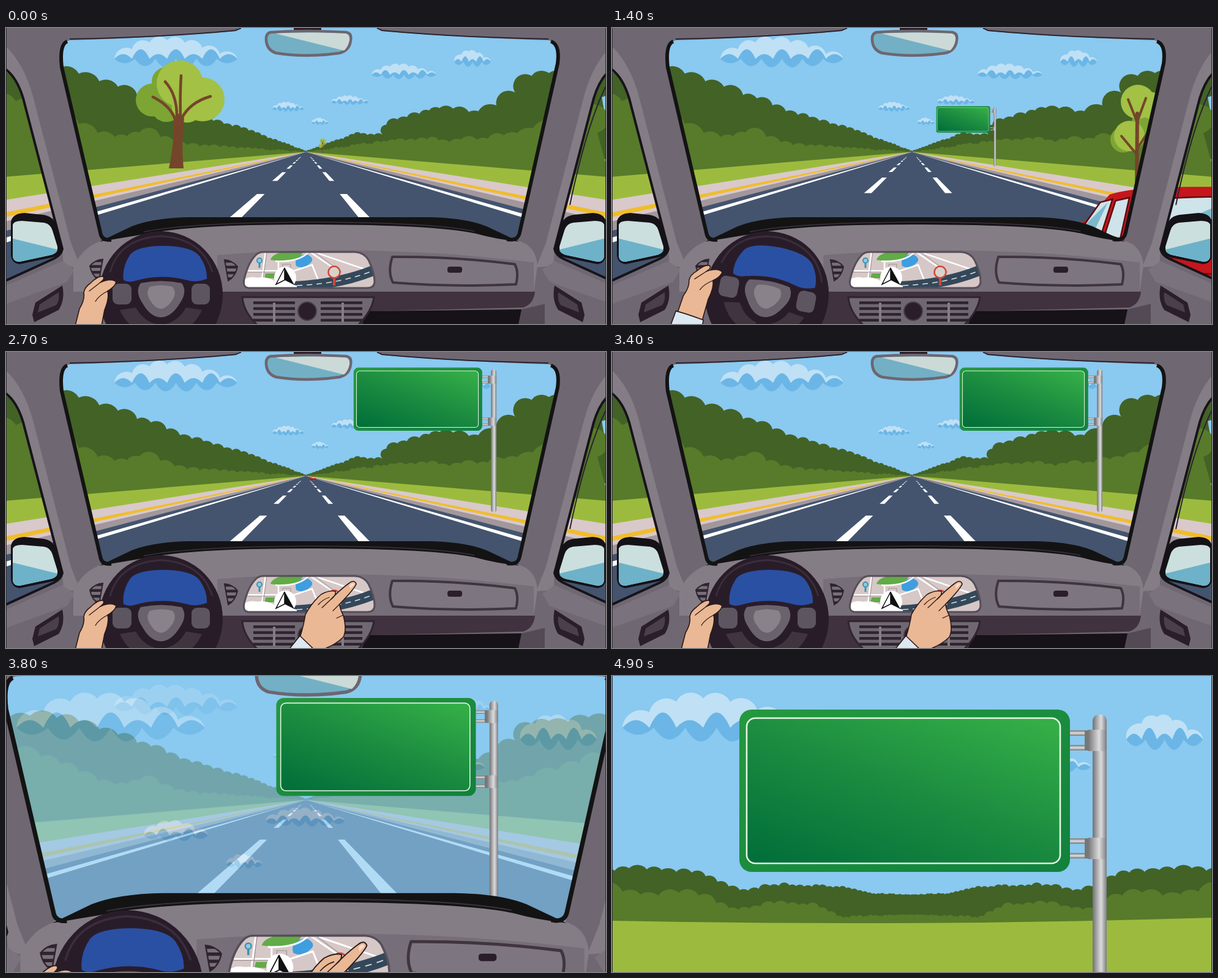
Recreate the animation shown at these times as an HTML page. Size 980 by 485 pixels, loop 5 s.

```html
<!DOCTYPE html>
<html lang="en">
<head>
<meta charset="utf-8">
<title>Road sign drive</title>
<style>
html, body { margin: 0; width: 100%; height: 100%; overflow: hidden; background: #8ac9f0; }
svg { display: block; width: 980px; height: 485px; }
.skin { fill: #eab895; stroke: #2b1a18; stroke-width: 1.6; stroke-linejoin: round; }
.crease { fill: none; stroke: #2b1a18; stroke-width: 1.3; stroke-linecap: round; }
.sleeve { fill: #dbe9f2; stroke: #2b1a18; stroke-width: 1.6; }
.wood { fill: none; stroke: #74452a; stroke-linecap: round; }
.shade { fill: #7ca534; }
.bright { fill: #a2c145; }
.road { fill: none; stroke: #fff; stroke-width: 2.5; }
.slats { fill: none; stroke: #2e232e; stroke-dasharray: 4.5 5; }
</style>
</head>
<body>
<svg viewBox="0 0 980 485">
<defs>
  <linearGradient id="panel" x1=".1" y1="1" x2=".9" y2="0">
    <stop offset="0" stop-color="#02703a"/><stop offset=".5" stop-color="#1b8b40"/><stop offset="1" stop-color="#34ae47"/>
  </linearGradient>
  <linearGradient id="rim" x1="0" y1="0" x2="1" y2="1">
    <stop offset="0" stop-color="#25993f"/><stop offset="1" stop-color="#11813d"/>
  </linearGradient>
  <linearGradient id="steel">
    <stop offset="0" stop-color="#717174"/><stop offset=".35" stop-color="#b0b0b2"/>
    <stop offset=".6" stop-color="#dcdcdd"/><stop offset="1" stop-color="#7c7c80"/>
  </linearGradient>
  <linearGradient id="bar" x2="0" y2="1">
    <stop offset="0" stop-color="#777"/><stop offset=".5" stop-color="#ddd"/><stop offset="1" stop-color="#777"/>
  </linearGradient>
  <clipPath id="screen"><path id="screenShape" d="M420 367H570Q585 368 592 380Q602 400 602 415Q602 426 590 426H398Q386 426 389 412Q395 385 408 372Q413 367 420 367Z"/></clipPath>
  <clipPath id="leftVent"><path id="leftVentShape" d="M137 390Q145 380 158 379L152 413Q140 406 137 390Z"/></clipPath>
  <g id="sideVent" stroke-width="2">
    <use href="#leftVentShape" fill="#776f79"/>
    <path class="slats" stroke-width="24" clip-path="url(#leftVent)" stroke-dasharray="2 3" d="M148 379V413"/>
    <use href="#leftVentShape" fill="none" stroke="#2f2430"/>
  </g>
  <g id="side">
    <path fill="#857d86" d="M0 30Q30 60 44 112L106 352L122 392L94 390L92 362L28 115Q18 82 0 68Z"/>
    <path fill="none" stroke="#17131a" stroke-width="4" d="M-20 60L0 68Q18 82 28 115L92 362Q90 372 78 378L-20 423"/>
    <path fill="#141216" d="M8 318Q10 304 30 303L60 306Q78 308 82 325L92 358Q93 372 75 376L22 387Q8 385 8 370Z"/>
    <path fill="#cbdfde" d="M11 322Q13 316 26 316L62 319Q73 321 76 332L84 358Q85 369 73 372L22 383Q11 383 11 372Z"/>
    <path fill="#6db2c8" d="M11 345L84 363Q84 369 73 372L22 383Q11 383 11 372Z"/>
    <path fill="#7a727c" d="M0 422L92 382L112 396L100 416L0 452Z"/>
    <path fill="#2a1e2a" d="M43 470L48 450L92 422Q97 445 86 462L46 482Z"/>
    <path fill="#4a404c" d="M52 466L55 453L86 433Q88 446 82 454Z"/>
  </g>
</defs>

<rect width="980" height="485" fill="#8ac9f0"/>
<g id="clouds"></g>
<g id="land"></g>
<path id="lanes" fill="#fff"/>
<g id="fade">
  <rect width="980" height="485" fill="#8ac9f0"/>
  <g id="clouds2"></g>
  <g id="field"></g>
</g>

<g id="sign">
  <rect x="-12" y="8" width="23" height="600" rx="10" fill="url(#steel)"/>
  <g id="clamp">
    <rect x="-52" y="34" width="32" height="9" fill="url(#bar)"/>
    <rect x="-52" y="58" width="32" height="9" fill="url(#bar)"/>
    <rect x="-25" y="34" width="6" height="33" fill="#777"/>
    <rect x="-20" y="33" width="31" height="35" rx="2" fill="url(#steel)"/>
  </g>
  <use href="#clamp" y="177"/>
  <rect x="-589" width="540" height="266" rx="20" fill="url(#rim)"/>
  <rect x="-577" y="14" width="512" height="238" rx="14" fill="url(#panel)" stroke="#e4f5e2" stroke-width="2.6"/>
</g>

<g id="tree">
  <g class="shade"><circle cx="239" cy="118" r="27"/><circle cx="262" cy="129" r="25"/><circle cx="262" cy="88" r="24"/></g>
  <g class="bright"><circle cx="284" cy="91" r="38"/><circle cx="321" cy="117" r="36"/><circle cx="296" cy="130" r="25"/></g>
  <path fill="#74452a" d="M266 230Q275 190 274 148L282 140L291 148Q286 190 290 230Z"/>
  <path class="wood" stroke-width="4.5" d="M277 152Q270 128 240 113M279 148Q280 110 260 88M285 150Q284 110 286 78M287 148Q300 122 334 112"/>
</g>
<g id="farTree">
  <g class="shade"><circle cx="-24" cy="-82" r="21"/><circle cx="12" cy="-110" r="22"/></g>
  <g class="bright"><circle cx="0" cy="-144" r="28"/><circle cx="-14" cy="-88" r="25"/><circle cx="22" cy="-138" r="22"/></g>
  <path class="wood" stroke-width="6" d="M-2 0L-1-125"/>
  <path class="wood" stroke-width="4" d="M-2-58L-27-88M-2-66L20-100M-1-110L-16-148M-1-112L13-150"/>
</g>

<g id="car">
  <ellipse cx="600" cy="297" rx="8" ry="13" fill="#2d292d"/>
  <path fill="#c5161d" d="M592 270Q591 252 602 249L608 244L619 231Q636 225 690 226Q722 227 728 237L735 262Q740 270 740 285L739 308Q735 315 720 314L640 312Q622 310 612 305Q608 288 600 285Q593 286 592 292Z"/>
  <ellipse cx="599" cy="297" rx="4" ry="9" fill="#aaa5a5"/>
  <ellipse cx="625" cy="306" rx="8" ry="9" fill="#2d292d"/><ellipse cx="624" cy="307" rx="4" ry="6" fill="#aaa5a5"/>
  <g fill="#cfe3ea" stroke="#5c0c10" stroke-width="1">
    <path d="M601 253L613 236L621 234L614 256Z"/><path d="M616 257L623 235L632 233L626 260Z"/>
    <path d="M644 235Q684 230 722 235L728 262Q685 267 640 262Z"/>
  </g>
  <path fill="#7db9cd" d="M641 259L700 234L716 235L655 263L641 261ZM601 253L618 236L609 255Z"/>
  <path fill="#a01016" d="M632 284Q680 292 739 283L739 308Q735 315 720 314L640 312Q632 306 632 284Z"/>
  <path fill="#e4322f" d="M633 266L655 269L652 279L634 277ZM738 268L716 270L718 280L739 278Z"/>
  <path fill="none" stroke="#7a0c11" stroke-width="1.2" d="M656 268Q665 282 680 283H710L718 268M633 262L631 306M616 258Q610 275 616 295"/>
  <rect x="668" y="305" width="42" height="6" fill="#f1cfc6"/>
</g>

<g id="cabin">
  <path fill="#6f6872" fill-rule="evenodd" d="M-60-60H1040V560H-60ZM104 20Q260 15 375 5Q385 2 384-60H606Q604 2 614 5Q730 15 886 20Q904 24 902 48L837 348H156L90 62Q88 24 104 20Z
    M-60 40L0 68Q18 82 28 115L92 362Q90 372 78 378L0 414L-60 440ZM1048 40L988 68Q970 82 960 115L896 362Q898 372 910 378L988 414L1048 440Z"/>
  <use href="#side"/><use href="#side" transform="matrix(-1 0 0 1 988 0)"/>
  <path fill="none" stroke="#2b2430" stroke-width="2" d="M104 18Q260 15 375 4L384 0M886 18Q730 15 614 4L606 0M980 95Q948 160 921 290"/>
  <path fill="#857d86" d="M110 392Q125 358 158 348L205 325Q260 315 490 315Q730 315 780 325L835 348Q866 356 868 390L862 432H110Z"/>
  <path fill="#766e78" d="M345 372Q600 352 862 384V434H345Z"/>
  <path fill="#141314" d="M153 350L205 325Q240 311 300 310H690Q750 311 785 325L838 350Q800 346 768 337Q700 322 490 322Q300 322 225 338Z"/>
  <path fill="none" stroke="#3a333c" stroke-width="1.5" d="M225 334Q300 319 490 318Q690 318 765 333"/>
  <path fill="none" stroke="#141314" stroke-width="6" stroke-linejoin="round" d="M100 22Q87 27 91 64L154 335Q156 349 172 347M890 22Q905 27 901 58L839 335Q836 350 818 346"/>
  <path fill="#40333f" d="M340 432H864Q862 452 845 458L600 464V490H340Z"/>
  <path fill="#171118" d="M590 464L842 461V490H580Z"/>
  <path fill="#534a55" d="M842 461L880 452V490H836Z"/>
  <path fill="#6f6872" stroke="#2f2430" stroke-width="3" d="M386 441H601Q598 464 574 488H412Q388 466 386 441Z"/>
  <path class="slats" stroke-width="68" d="M438 448V483M548 448V483"/>
  <path stroke="#857d86" stroke-width="4" d="M438 450V482M550 450V482"/>
  <circle cx="492" cy="464" r="15" fill="#2a1e2a" stroke="#4a3f4b" stroke-width="2"/>
  <use href="#sideVent"/><use href="#sideVent" transform="matrix(-1 0 0 1 515 1)"/>
  <path fill="#7d757f" stroke="#40353f" stroke-width="4" stroke-linejoin="round" d="M631 375Q730 374 831 387Q838 400 833 420Q730 425 632 417Q623 400 631 375Z"/>
  <rect x="721" y="391" width="24" height="10" rx="4" fill="#2a1e2a"/>

  <g clip-path="url(#screen)">
    <rect x="380" y="360" width="230" height="70" fill="#d6c8c7"/>
    <path fill="#62ab46" d="M432 380Q436 364 487 364L478 380Q455 384 432 380ZM424 402H440V410H422Z"/>
    <path fill="#3f9edf" d="M474 390Q470 378 482 373Q490 368 497 374Q504 380 496 386Q486 396 474 390Z"/>
    <path class="road" d="M424 366L418 412M395 398H470M440 382Q480 384 495 366L545 400M470 398L500 388L515 426M445 382V405M500 366L600 400"/>
    <path fill="none" stroke="#9b9296" d="M392 400H470M426 366L420 412M500 364L548 400M452 387H465V395H452Z"/>
    <path fill="none" stroke="#34485a" stroke-width="17" d="M465 424Q550 420 610 393"/>
    <path fill="none" stroke="#d9e0e2" stroke-width="1.5" stroke-dasharray="9 7" d="M475 422Q550 419 606 395"/>
    <path fill="#fff" d="M385 430V414Q396 406 410 409Q425 407 438 414L475 422V430Z"/>
    <path fill="none" stroke="#3e93b4" stroke-width="3" d="M414 385V393"/><circle cx="414" cy="381" r="4" fill="#8fcbe0" stroke="#3e93b4" stroke-width="2"/>
    <path stroke="#d4463a" stroke-width="4" d="M536 408V422"/>
    <circle cx="536" cy="400" r="9.5" fill="#d8d2cc" stroke="#d4463a" stroke-width="2.5"/>
    <circle cx="456" cy="409" r="18" fill="#fff"/>
    <path fill="#fff" stroke="#111" stroke-width="1.5" d="M455 393L441 420L455 413Z"/><path fill="#111" d="M455 392L471 421L455 413Z"/>
  </g>
  <use href="#screenShape" fill="none" stroke="#574e59" stroke-width="3"/>

  <path fill="#2a1e2a" d="M470-30H515V3Q492 7 470 3Z"/>
  <path id="mirror" fill="#73b0c5" stroke="#6d6670" stroke-width="4.5" d="M432 7Q490 3 556 7Q565 9 563 20Q561 37 545 41Q490 49 441 41Q426 36 425 20Q424 9 432 7Z"/>
  <path fill="#cbdad6" d="M440 9Q490 6 555 9Q562 11 561 20Q559 31 552 37Z"/>

  <g id="wheel">
    <ellipse cx="253" cy="437" rx="101" ry="104" fill="#291c29"/>
    <path fill="none" stroke="#3b2d3b" stroke-width="3" d="M170 400Q185 345 253 341Q320 345 337 400"/>
    <path fill="#2a50a3" d="M192 413Q189 392 203 371Q215 357 260 357Q305 358 317 375Q329 393 328 411Q310 418 295 413Q253 402 212 414Q200 418 192 413Z"/>
    <path fill="#40343f" d="M186 462L212 458Q224 480 245 485L240 505Q200 495 186 462ZM320 462L294 458Q282 480 261 485L266 505Q306 495 320 462Z"/>
    <g fill="#5d5560"><rect x="174" y="419" width="31" height="34" rx="9"/><rect x="303" y="419" width="30" height="34" rx="9"/></g>
    <path fill="#6a626c" d="M220 418Q253 411 287 418Q297 432 284 451Q270 474 253 474Q236 474 223 451Q210 432 220 418Z"/>
    <path fill="#8a828b" d="M235 424Q253 419 272 424Q280 434 271 447Q262 460 253 460Q244 460 236 447Q227 434 235 424Z"/>
  </g>
  <g id="grip">
    <path class="skin" d="M112 492L120 460Q129 445 127 434Q128 425 138 418Q150 406 158 407Q163 410 154 417Q172 409 180 416Q178 424 166 431Q169 443 161 462L154 498Z"/>
    <path class="sleeve" d="M110 486Q132 490 156 497L150 560H90Z"/>
    <path class="crease" d="M154 417L136 431M166 431Q152 438 146 448"/>
  </g>

  <g id="hand">
    <path class="skin" d="M560 379Q569 372 572 380Q570 387 545 413Q545 420 551 432Q557 455 551 467Q535 483 506 491L480 468Q487 445 489 430Q500 410 515 397Q528 390 538 392Q540 398 531 405Q545 390 560 379Z"/>
    <path class="sleeve" d="M480 465L508 492L480 560L420 540Z"/>
    <path class="crease" d="M531 405L516 419M545 413L534 424M551 431L540 436M510 414Q518 405 528 402"/>
    <path fill="#f8dccb" d="M561 382Q568 376 569 381L562 388Z"/>
  </g>
</g>
<path stroke="#2b2b30" d="M.5 0V485M979.5 0V485"/>
</svg>
<script>
const $ = id => document.getElementById(id);
const VX = 490, VY = 203, LOOP = 5;
const DARK = '#436226', LEAF = '#577b2a', GRASS = '#9cbb3e';

let seed = 7;
const random = () => (seed = seed * 16807 % 2147483647) / 2147483647;

// Linear interpolation through [position, value] pairs
const key = (t, ...k) => {
  const i = k.findIndex(p => t < p[0]);
  if (i === 0) return k[0][1];
  if (i < 0) return k[k.length - 1][1];
  const [[a, u], [b, v]] = [k[i - 1], k[i]];
  return u + (v - u) * (t - a) / (b - a);
};

// Arcs along a hump for the lit top, waves for the shaded foot
function cloud(x, y, w, h) {
  const n = w > 3 * h ? 7 : 5, step = w / n, foot = .72 * h;
  let top = `M0 ${foot}`, wave = top, py = foot;
  for (let i = 1; i <= n; i++) {
    const q = foot - .58 * h * Math.sin(Math.PI * (i / n) ** .8) ** 1.3;
    const r = Math.hypot(step, q - py) * .6;
    top += `A${r} ${r} 0 0 1 ${i * step} ${q}`;
    wave += `q${step / 2} ${-h * (i % 2 ? .3 : .6)} ${step} 0`;
    py = q;
  }
  for (let i = 1; i < n; i++) {
    const s = w / (n - 1);
    wave += `q${-s / 2} ${.55 * h * Math.sin(Math.PI * (i - .5) / (n - 1)) ** .5} ${-s} 0`;
  }
  return `<g transform="translate(${x} ${y})"><path fill="#bfe0f5" d="${top}Z"/><path fill="#6bb6e6" d="${wave}Z"/></g>`;
}

// Discs strung along a tree line, smaller towards the horizon
function hedge(color, base, size, ...line) {
  const start = line[0][0], end = line[line.length - 1][0];
  let d = `M${start} ${base}`, discs = '';
  for (let x = start, r; x <= end; x += r * 1.35) {
    r = 3 + Math.abs(x - VX) * size * (.8 + .4 * random());
    const y = key(x, ...line) + r * (1 + .35 * random());
    d += `L${x} ${y}`;
    discs += `<circle cx="${x}" cy="${y}" r="${r}"/>`;
  }
  return `<g fill="${color}"><path d="${d}L${end} ${base}Z"/>${discs}</g>`;
}
const wedge = (slope, color) =>
  `<path fill="${color}" d="M${VX} ${VY}L-510 ${VY + 1000 * slope}V1400H1490V${VY + 1000 * slope}Z"/>`;

$('clouds').innerHTML = cloud(177, 13, 201, 52) + cloud(435, 120, 52, 17) + cloud(597, 58, 106, 26) +
  cloud(531, 110, 62, 16) + cloud(732, 34, 60, 30) + cloud(499, 146, 28, 13);
$('clouds2').innerHTML = cloud(17, 25, 308, 83) + cloud(840, 58, 125, 64) + cloud(225, 235, 105, 36) +
  cloud(424, 215, 130, 32) + cloud(360, 290, 58, 26) + cloud(640, 125, 142, 34);

$('land').innerHTML =
  hedge(DARK, 215, .055, [-10, 65], [75, 48], [170, 82], [282, 128], [390, 162], [490, 201]) +
  hedge(DARK, 215, .055, [490, 201], [572, 170], [605, 174], [630, 145], [732, 123], [775, 137], [855, 66], [990, 50]) +
  hedge(LEAF, 260, .055, [-10, 98], [110, 140], [165, 172], [235, 163], [300, 186], [490, 202]) +
  hedge(LEAF, 260, .055, [490, 202], [650, 178], [785, 176], [860, 158], [990, 115]) +
  [[.083, GRASS], [.16, '#d9c9cb'], [.202, '#f0bd2c'], [.218, '#d9c9cb'], [.232, '#a1979c'], [.264, '#44546e'],
    [.286, '#fff'], [.303, '#44546e']].map(w => wedge(...w)).join('');

const both = html => html + `<g transform="matrix(-1 0 0 1 975 0)">${html}</g>`;
$('field').innerHTML =
  both(hedge(DARK, 420, .034, [-8, 314], [30, 303], [133, 314], [210, 346], [262, 337], [378, 343], [420, 354], [490, 358])) +
  both(hedge(LEAF, 420, .045, [-8, 336], [55, 350], [115, 340], [205, 380], [260, 367], [330, 371], [375, 392], [490, 390])) +
  `<path fill="${GRASS}" d="M0 401Q490 411 980 396V900H0Z"/>`;

const place = (id, value) => $(id).setAttribute('transform', value);
const about = (x, y, s) => `translate(${x} ${y}) scale(${s}) translate(${-x} ${-y})`;
const show = (id, on) => $(id).style.display = on ? '' : 'none';

// Lane marks sit at even steps of depth u, drawn 1/u below the horizon
function laneMarks(travel) {
  const step = .0155, length = .009;
  let d = '';
  for (let far = .0145 - travel % step; far < .13; far += step) {
    if (far < .003) continue;
    const a = 1 / far, b = 1 / Math.max(far - length, .003);
    for (const [p, q] of [[-1.16, -.98], [.8, .97]])
      d += `M${VX + p * a} ${VY + a}L${VX + q * a} ${VY + a}L${VX + q * b} ${VY + b}L${VX + p * b} ${VY + b}Z`;
  }
  return d;
}

function draw(now) {
  const t = Math.floor(now / 100) % (LOOP * 10) / 10;

  $('lanes').setAttribute('d', laneMarks(key(t, [0, 0], [1.4, .0527], [2.2, .0848], [2.6, .0921])));
  place('tree', about(VX, VY, 1 + 2.2 * t));
  show('tree', t < 2);
  const near = t / 1.4;
  place('farTree', `translate(${517 + 342 * near} ${205 + 60 * near}) scale(${.14 + .86 * near})`);
  show('farTree', t < 2.5);
  place('car', about(VX, VY, Math.max(0, 2.5 - 1.875 * (t - 1.4))));

  const w = key(t, [.59, 0], [1.4, 88], [2.2, 175], [2.52, 210], [3.55, 210], [3.8, 326], [4.1, 480], [4.3, 540]);
  const x = Math.min(797, 502 + 1.404 * w);
  const y = w <= 210 ? 202 - .84 * w : 25.6 + 29.4 * (w - 210) / 330;
  place('sign', `translate(${x} ${y}) scale(${w / 540})`);

  const turn = key(t, [.8, 0], [1.4, 1], [2, 0]);
  place('wheel', `rotate(${11 * turn} 253 437)`);
  place('grip', `translate(0 ${-16 * turn}) rotate(${5 * turn} 180 418)`);
  const away = key(t, [1.7, 1], [2.2, .35], [2.5, 0]);
  place('hand', `translate(${-106 * away} ${122 * away})`);

  place('cabin', about(495, 107, key(t, [3.55, 1], [3.8, 1.225], [4.1, 1.6], [4.4, 2])));
  $('fade').setAttribute('opacity', key(t, [3.6, 0], [3.8, .66], [4, 1]));
  place('field', `translate(0 ${200 * (1 - key(t, [3.7, 0], [4.3, 1])) ** 3})`);
  requestAnimationFrame(draw);
}
draw(0);
</script>
</body>
</html>
```
